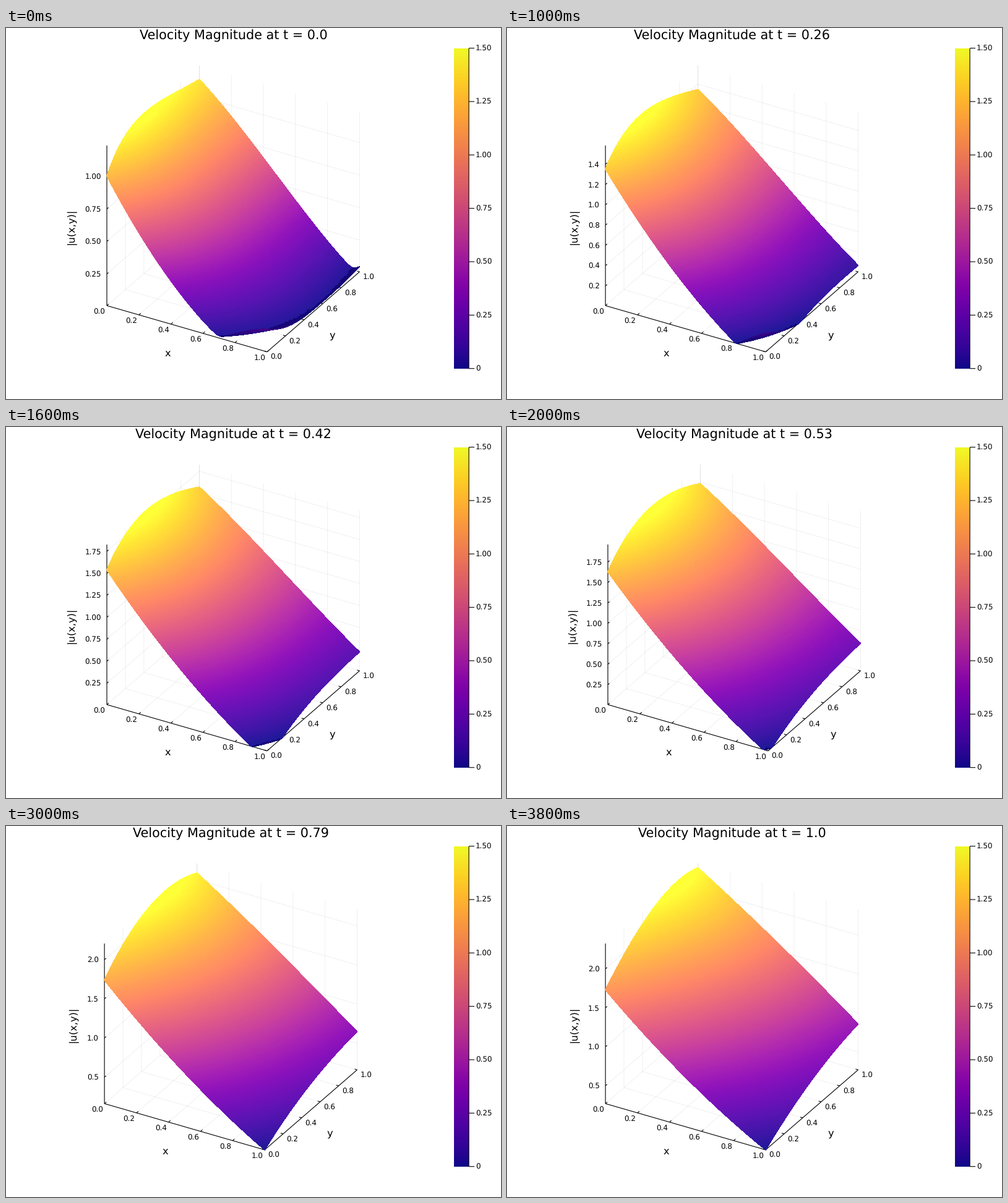
Write a matplotlib script that moves like this. It is 800x600 px and loops after 4 s.

```python
import matplotlib.pyplot as plt
import numpy as np
from matplotlib.animation import FuncAnimation
from matplotlib.collections import LineCollection, PolyCollection

FRAMES, LOOP = 20, 4000
W, H, DPI = 800, 600, 100
PX = 72 / DPI
TICK, GUIDE, TITLE = 11.85 * PX, 16.3 * PX, 20.74 * PX
SCALE = 299
plt.rcParams.update({"font.family": "DejaVu Sans", "text.hinting": "none"})

# Corner velocities u(0,0), u(0,1), u(1,0), u(1,1) and the peak over time
TIMES = np.array([0, 3, 5, 8, 13, 17, 19]) / 19
KEYS = np.array([
    [1.003, 1.131, -0.180, -0.040, 1.238],
    [1.212, 1.231, -0.208, 0.002, 1.419],
    [1.353, 1.350, -0.190, 0.067, 1.585],
    [1.538, 1.570, -0.110, 0.222, 1.827],
    [1.717, 1.957, 0.092, 0.531, 2.126],
    [1.739, 2.187, 0.219, 0.758, 2.270],
    [1.730, 2.270, 0.270, 0.857, 2.325],
])
COEFS = np.polyfit(TIMES, KEYS, 5)

N = 100
side = np.linspace(0, 1, N + 1)
X, Y = np.meshgrid(side, side, indexing="ij")
cx, cy = np.meshgrid(side[:-1], side[:-1], indexing="ij")
ORDER = np.argsort((0.5 * cx - 0.866 * cy).ravel(), kind="stable")
cmap = plt.get_cmap("plasma")


def velocity(t):
    """Signed velocity on the grid, with its plotted range."""
    u00, u01, u10, u11, hi = np.polyval(COEFS, t)
    flat = (1 - X) * ((1 - Y) * u00 + Y * u01) + X * ((1 - Y) * u10 + Y * u11)

    s = side[1:-1]
    skew = 1.4 - 1.7 * t
    bump = s * (1 - s) * np.exp(skew * (0.5 - s))
    amp = np.min((hi - u00 - (u01 - u00) * s) / bump)

    left = amp * np.exp(skew * (0.5 - Y))
    right = (0.4 - 0.03 * t) * np.exp(0.8 * (1 - t) * (0.5 - Y))
    front = -0.38 - 0.42 * (1 - t) ** 2
    back = (1 - t) * (0.2 - 0.45 * X) + 0.13 * t
    u = (flat + Y * (1 - Y) * ((1 - X) * left + X * right)
         + X * (1 - X) * ((1 - Y) * front + Y * back))
    return u, max(0.006, u10), hi


def tick_step(i):
    if i < 4 or 8 <= i <= 10:
        return 0.25
    return 0.2 if i < 8 else 0.5


def cells(a):
    """Four corners of each grid cell."""
    return np.stack([a[:-1, :-1], a[1:, :-1], a[1:, 1:], a[:-1, 1:]], axis=-1)


def lines(ax, segs, alpha=1.0, width=1.1, z=2):
    ax.add_collection(LineCollection(segs, colors="black", alpha=alpha, snap=False,
                                     linewidths=width * PX, zorder=z))


def label(ax, x, y, s, size=TICK, ha="center"):
    ax.text(x, y, s, fontsize=size, ha=ha, va="baseline")


def stage(ax):
    ax.set(xlim=(0, W), ylim=(H, 0))
    ax.axis("off")


def colorbar(ax):
    ax.imshow(np.linspace(1, 0, 256)[:, None], cmap=cmap, aspect="auto",
              extent=(724, 748, 551, 33), interpolation="nearest")
    segs = [[(748.1, 33), (748.1, 551)]]
    for k in range(7):
        y = 550.7 - k * 86.35
        segs.append([(748.1, y), (757, y)])
        label(ax, 759, y + 4.3, f"{k / 4:.2f}" if k else "0", ha="left")
    lines(ax, segs)
    stage(ax)


fig = plt.figure(figsize=(W / DPI, H / DPI), dpi=DPI, facecolor="white")
colorbar(fig.add_axes([0, 0, 1, 1]))
plot = fig.add_axes([0, 0, 1, 1])


def draw(i):
    t = i / (FRAMES - 1)
    step = tick_step(i)
    wide = step == 0.25
    x0 = 163.0 if wide else 159.1
    u, lo, hi = velocity(t)

    def project(x, y, z):
        return (x0 + SCALE * (0.866 * x + 0.5 * y),
                449 + SCALE * (0.25 * x - 0.433 * y - 0.866 * z))

    def seg(a, b):
        return [project(*a), project(*b)]

    def dash(p, dx, dy):
        return [p, (p[0] + dx, p[1] + dy)]

    plot.clear()
    values = np.arange(1, int(hi / step) + 1) * step
    values = values[values > lo]

    grid, axes = [], [seg((0, 0, 0), (1, 0, 0)), seg((1, 0, 0), (1, 1, 0)),
                      seg((0, 0, 0), (0, 0, 1))]
    for k in range(6):
        v = k / 5
        grid += [seg((v, 0, 0), (v, 1, 0)), seg((0, v, 0), (1, v, 0)),
                 seg((v, 1, 0), (v, 1, 1)), seg((0, v, 0), (0, v, 1))]
        p, q = project(v, 0, 0), project(1, v, 0)
        axes += [dash(p, 3, -2.6), dash(q, -4, -1.1)]
        label(plot, p[0] - 11.9, p[1] + 13.9, f"{v:.1f}")
        label(plot, q[0] + 14.7, q[1] + 12.5, f"{v:.1f}")
    for v in values:
        z = (v - lo) / (hi - lo)
        grid += [seg((0, 0, z), (0, 1, z)), seg((0, 1, z), (1, 1, z))]
        p = project(0, 0, z)
        axes.append(dash(p, 2.6, -2.2))
        label(plot, x0 - 9.2, p[1] + 4.8, f"{v:.2f}" if wide else f"{v:.1f}",
              ha="right")
    lines(plot, grid, alpha=0.06, width=1, z=1)
    lines(plot, axes)

    # A faint cross flow rounds the crease at the start
    speed = np.hypot(u, 0.022 * np.exp(-8 * t))
    z = np.clip((speed - lo) / (hi - lo), 0, 1)
    px, py = project(X, Y, z)
    quads = np.stack([cells(px), cells(py)], axis=-1).reshape(-1, 4, 2)
    rgb = cmap(cells(z).mean(-1).ravel())[:, :3]
    # The part past the crease shows its unlit underside
    lit = cells(u).mean(-1).ravel()[:, None] >= 0
    rgb = np.clip(np.where(lit, rgb * 1.01 + 0.065, rgb * 0.85), 0, 1)
    plot.add_collection(PolyCollection(
        quads[ORDER], facecolors=rgb[ORDER], edgecolors="face",
        linewidths=0.4, antialiaseds=False, zorder=3))

    label(plot, x0 + 204.6, 18.2, f"Velocity Magnitude at t = {round(t, 2)}", TITLE)
    label(plot, x0 + 98.4, 531, "x", GUIDE)
    label(plot, x0 + 364.4, 503, "y", GUIDE)
    plot.text(105.6 if wide else 109.4, 320.4, "|u(x,y)|", fontsize=GUIDE,
              rotation=90, ha="center", va="center")
    stage(plot)
    return []


anim = FuncAnimation(fig, draw, frames=FRAMES, interval=LOOP / FRAMES,
                     init_func=lambda: draw(0), repeat=True, repeat_delay=0)
plt.show()
```
